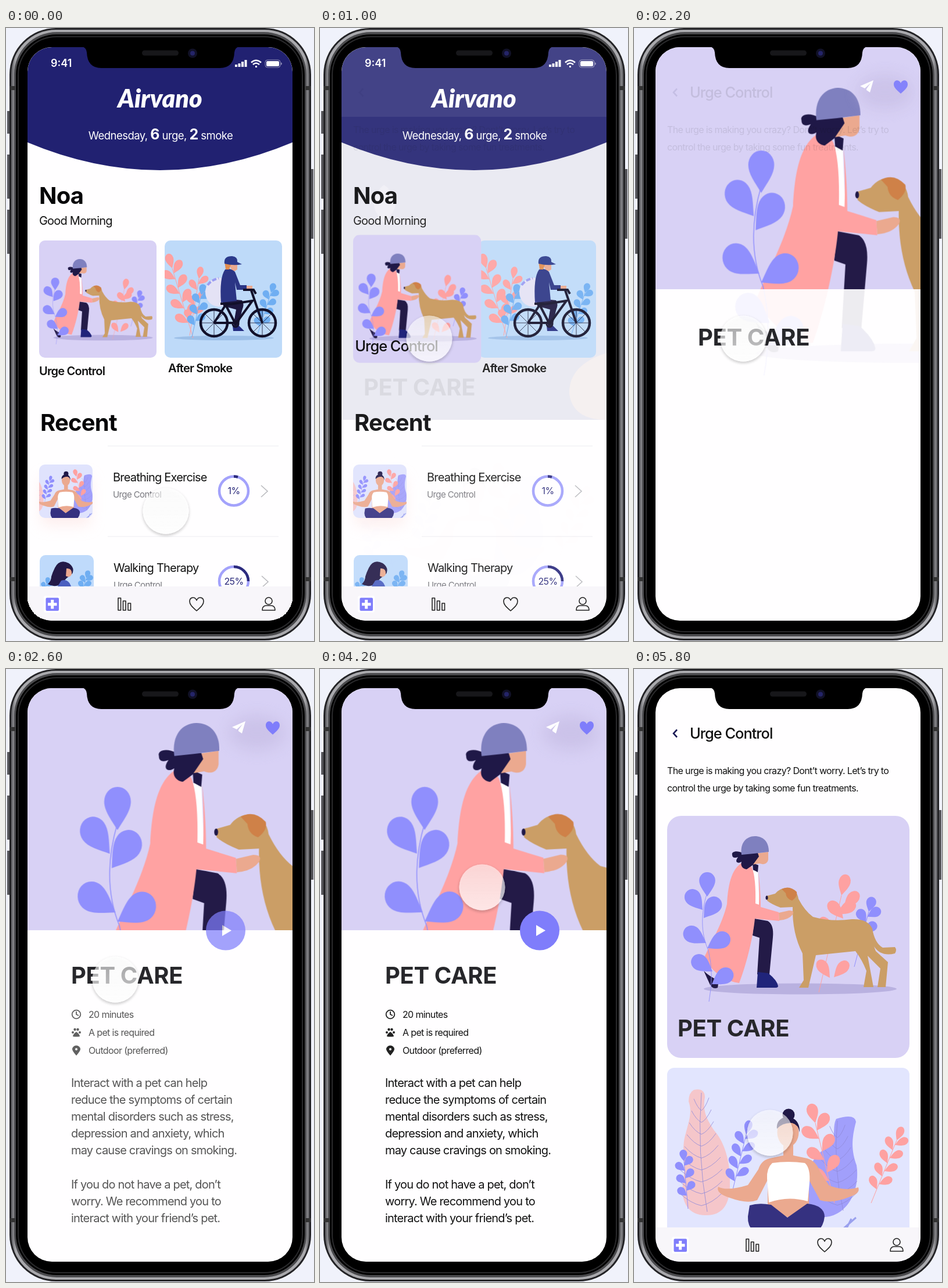
These frames come from a looping animation (530 px wide and 1056 px high, 5.9 s). An HTML page:

```html
<!DOCTYPE html>
<html lang="en">
<head>
<meta charset="utf-8">
<title>Urge control app</title>
<style>
html, body { margin: 0; width: 100%; height: 100%; overflow: hidden; background: #f0f2fb; }
svg { display: block; width: 100vw; height: 100vh; }
text { font-family: Inter, Roboto, sans-serif; letter-spacing: -.04em; fill: #111; white-space: pre; }
.big { font-size: 40px; font-weight: 700; letter-spacing: -.02em; fill: #050507; }
.t20 { font-size: 20px; }
.t16 { font-size: 16px; }
.semi { font-weight: 600; }
.grey { fill: #77777d; font-size: 15px; }
.mid { text-anchor: middle; }
.line { fill: none; stroke: #222; stroke-width: 1.6; stroke-linejoin: round; stroke-linecap: round; }
.anim { animation: 5.9s ease-in-out infinite; }

.home { animation-name: home; }
@keyframes home { 0%, 16.1% { opacity: 1 } 20.34%, 100% { opacity: 0 } }
.veil { animation-name: veil; }
@keyframes veil { 0%, 16.1% { opacity: 0 } 16.6% { opacity: 1 } 20.34%, 100% { opacity: 0 } }
.urge { animation-name: urge; }
@keyframes urge {
  0%, 16.1% { opacity: 0 } 20.34%, 33.05% { opacity: 1 }
  38.5%, 71.53% { opacity: 0 } 75.93%, 100% { opacity: 1 }
}
.next { animation-name: next; }
@keyframes next {
  0%, 16.7% { opacity: 0 } 20.34%, 33.05% { opacity: 1 }
  37%, 71.53% { opacity: 0 } 75.93%, 100% { opacity: 1 }
}
.label { animation-name: label; animation-timing-function: step-end; }
@keyframes label { 0% { opacity: 1 } 16.1%, 100% { opacity: 0 } }
.heading { animation-name: heading; }
@keyframes heading {
  0%, 16.09% { opacity: 0; transform: translate(57px, 598px) }
  16.1% { opacity: 1; transform: translate(57px, 598px) }
  20.34%, 33.05% { opacity: 1; transform: translate(96px, 120px) }
  38.5%, 71.53% { opacity: 0; transform: translate(96px, 120px) }
  75.93%, 100% { opacity: 1; transform: translate(96px, 120px) }
}
.frame { animation-name: frame; }
@keyframes frame {
  0%, 16.1% { x: 57px; y: 366px; width: 202px; height: 202px; rx: 10px }
  20.34%, 33.05% { x: 57px; y: 253px; width: 417px; height: 417px; rx: 24px }
  37.1%, 71.53% { x: 37px; y: 33px; width: 456px; height: 417px; rx: 0px }
  75.93%, 100% { x: 57px; y: 253px; width: 417px; height: 417px; rx: 24px }
}
.pet { animation-name: pet; }
@keyframes pet {
  0%, 16.1% { transform: matrix(.515, 0, 0, .515, 19.7, 249.7) }
  20.34%, 33.05% { transform: matrix(1, 0, 0, 1, 0, 0) }
  38.14% { transform: matrix(1.645, 0, 0, 1.78, 17, -420); animation-timing-function: ease-out }
  49%, 71.53% { transform: matrix(1.66, 0, 0, 1.77, -29, -416.5) }
  75.93%, 100% { transform: matrix(1, 0, 0, 1, 0, 0) }
}
.ghost { animation-name: ghost; }
@keyframes ghost { 0%, 33.05% { opacity: 0 } 35%, 37.3% { opacity: .08 } 39%, 100% { opacity: 0 } }
.petTitle { animation-name: petTitle; }
@keyframes petTitle {
  0%, 16.1% { opacity: 0; transform: translate(75px, 633px) }
  20.34%, 33.05% { opacity: 1; transform: translate(75px, 633px) }
  38.14%, 71.53% { opacity: 1; transform: translate(112px, 542px) }
  75.93%, 100% { opacity: 1; transform: translate(75px, 633px) }
}
.tools { animation-name: tools; }
@keyframes tools { 0%, 33.05% { opacity: 0 } 38.14%, 71.53% { opacity: 1 } 75.93%, 100% { opacity: 0 } }
.detail { animation-name: detail; }
@keyframes detail { 0%, 39.8% { opacity: 0 } 46.6%, 71.53% { opacity: 1 } 75.93%, 100% { opacity: 0 } }
.nav { animation-name: nav; }
@keyframes nav { 0%, 33.05% { opacity: 1 } 37%, 71.53% { opacity: 0 } 75.93%, 100% { opacity: 1 } }
.cursor { animation-name: cursor; }
@keyframes cursor {
  0% { transform: translate(275px, 832px) }
  11.86%, 60.2% { transform: translate(188px, 535px) }
  70.3%, 78% { transform: translate(279px, 376px) }
  95%, 100% { transform: translate(234px, 799px) }
}
</style>
</head>
<body>
<svg viewBox="0 0 530 1056" preserveAspectRatio="none">
<defs>
  <clipPath id="screen"><rect x="37" y="33" width="456" height="988" rx="42"/></clipPath>
  <clipPath id="card"><rect class="anim frame"/></clipPath>
  <clipPath id="yogaCard"><rect x="57" y="687" width="417" height="417" rx="12"/></clipPath>
  <clipPath id="bikeCard"><rect x="273" y="366" width="202" height="202" rx="10"/></clipPath>
  <clipPath id="thumbA"><rect x="57" y="752" width="92" height="92" rx="10"/></clipPath>
  <clipPath id="thumbB"><rect x="58" y="908" width="93" height="92" rx="10"/></clipPath>
  <linearGradient id="glass" x2="0" y2="1">
    <stop stop-color="#fff" stop-opacity=".4"/><stop offset="1" stop-color="#fff" stop-opacity=".66"/>
  </linearGradient>
  <linearGradient id="metal">
    <stop stop-color="#5c5c60"/><stop offset=".015" stop-color="#a9a9ad"/>
    <stop offset=".985" stop-color="#a9a9ad"/><stop offset="1" stop-color="#5c5c60"/>
  </linearGradient>
  <filter id="shadow" x="-30%" y="-30%" width="160%" height="160%">
    <feDropShadow dx="0" dy="2" stdDeviation="2.5" flood-color="#222" flood-opacity=".45"/>
    <feComposite in2="SourceAlpha" operator="out" result="rim"/>
    <feMerge><feMergeNode in="rim"/><feMergeNode in="SourceGraphic"/></feMerge>
  </filter>
  <filter id="blur" x="-60%" y="-60%" width="220%" height="220%"><feGaussianBlur stdDeviation="13"/></filter>
  <path id="heart" d="M0 11C-8 4-12 0-12-5C-12-13-3-14 0-7C3-14 12-13 12-5C12 0 8 4 0 11Z"/>

  <g id="petArt">
    <ellipse cx="286" cy="551" rx="166" ry="9.5" fill="#b9b1e0"/>
    <g id="petBack"></g>
    <path fill="#231a47" d="M120 520Q130 530 146 537L144 549Q135 553 130 542Z"/>
    <path fill="#231a47" d="M207 430L230 434Q241 440 239 462L233 526H212L216 463L204 459Z"/>
    <path fill="#20247a" d="M213 522L231 524Q246 536 248 546Q248 549 244 549H211Z"/>
    <path fill="#fff" d="M203 347L213 344L216 410L208 405Z"/>
    <path fill="#ffa2a2" d="M194 330C168 338 162 370 160 405C152 440 130 475 121 497C135 525 160 538 181 541C195 505 205 460 208 430L250 434L249 419L218 410C218 385 216 365 214 348Q216 380 215 406L209 404Q210 360 203 342Z"/>
    <path fill="#1f1847" d="M204 334L214 338L213 350L205 346Z"/>
    <path fill="#eba98f" d="M210 318L231 315V328C230 335 224 338 216 335L203 337Z"/>
    <path fill="#1f1847" d="M187 317C178 312 167 314 169 320C169 327 176 325 179 324C172 333 179 336 185 332C182 341 190 345 194 345L204 338L215 323L213 317Z"/>
    <path fill="#7f80bf" d="M185 320C182 300 193 288 208 288C222 288 232 297 232 315Q208 318 185 320Z"/>
    <path fill="#cb9e66" d="M228 391L243 387Q252 376 266 377Q281 381 283 396Q294 417 308 427Q340 436 375 431Q402 430 410 447Q414 472 428 480L449 479Q453 484 449 490Q425 496 413 478L416 486L437 505L433 548H419L424 516L402 494L412 548H395L400 520Q392 500 381 486L313 493L300 549H284L292 536L290 490Q272 455 273 410L252 411Q236 405 229 399Z"/>
    <path fill="#cf8148" d="M254 379Q268 372 280 384Q282 392 272 399Q262 396 261 386Z"/>
    <ellipse cx="228.5" cy="394" rx="2" ry="3.5" fill="#1f1847"/>
    <path fill="#eba98f" d="M249 420L267 416Q277 416 273 423Q266 432 250 433Z"/>
    <g id="petFront"></g>
  </g>

  <g id="yogaArt">
    <path fill="#f5c6ca" d="M103 725Q122 721 122 738C118 760 124 774 138 795C156 815 166 850 165 885C166 925 150 941 125 941C95 942 78 920 85 880C90 850 80 830 89 800C96 775 100 762 94 745Q94 730 103 725Z"/>
    <path fill="#a19ffb" d="M348 775Q380 765 382 780C374 810 374 830 383 855C390 900 365 945 325 944C300 942 288 915 292 890C294 860 318 830 335 822C350 810 340 790 348 775Z"/>
    <g id="yogaPlants"></g>
    <circle cx="266" cy="768" r="10.5" fill="#1f1847"/>
    <path fill="#eba98f" d="M257 812H274V838L298 843Q314 848 320 866L336 890Q365 900 386 893Q390 903 372 909Q340 922 320 915L301 880V924L265 945L230 924V880L212 915Q195 922 165 911Q140 903 145 892Q160 900 196 889L214 862Q219 846 234 843L257 838Z"/>
    <ellipse cx="265" cy="798" rx="18.5" ry="25" fill="#eba98f"/>
    <path fill="#1f1847" d="M246 792C243 765 287 763 285 798Q283 785 272 782Q256 781 246 792Z"/>
    <path fill="#fff" d="M238 851Q265 847 294 851Q304 860 302 885L299 917Q265 907 232 919L229 878Q228 860 238 851Z"/>
    <path fill="#353180" d="M199 924Q215 919 236 923L264 945L298 921Q327 924 328 943Q325 975 285 984H240Q194 975 196 943Z"/>
    <path fill="none" stroke="#9aa0ee" stroke-width="3" d="M358 966L382 945M364 967L374 947"/>
  </g>

  <g id="bikeArt">
    <rect x="273" y="366" width="202" height="202" fill="#bedaf9"/>
    <ellipse cx="375" cy="534" rx="86" ry="4" fill="#9cbfe8"/>
    <g id="bikePlants"></g>
    <ellipse cx="366" cy="455" rx="23" ry="25" fill="#e4e2f5"/>
    <path fill="none" stroke="#9a9cf2" stroke-width="4" d="M347 443Q353 434 366 431" stroke-dasharray="8 3"/>
    <path fill="#1d1840" d="M372 466L406 469Q411 475 406 487L400 514H391L396 485L374 479Z"/>
    <path fill="#232b80" d="M390 513H401L410 522H391Z"/>
    <path fill="#eba98f" d="M404 444L424 444V450H404ZM381 401H398V416L390 421Z"/>
    <path fill="#2b3585" d="M377 416Q386 413 394 420L403 443H414V451H397L394 438L397 470L370 473Q367 430 377 416Z"/>
    <path fill="#e28d4e" d="M376 402H389L384 416H378Z"/>
    <path fill="#2b3a8c" d="M376 406Q374 393 389 393Q399 394 398 403L406 407Q392 410 376 406Z"/>
    <g fill="none" stroke="#12102a">
      <g stroke-width="4.5"><circle cx="358" cy="508" r="23"/><circle cx="441" cy="508" r="23"/>
      <path stroke-width="4" d="M358 508L378 477L424 470L395 510L378 477M358 508H395M441 508L422 452M408 451H426L430 458M369 475H386"/></g>
      <path stroke-width=".8" d="M358 486V530M336 508H380M342 492L374 524M342 524L374 492M441 486V530M419 508H463M425 492L457 524M425 524L457 492"/>
      <circle cx="395" cy="510" r="5" stroke-width="3"/>
    </g>
  </g>
</defs>

<!-- phone body -->
<path fill="#55555a" d="M2 143h5v39H2zM2 218h5v76H2zM2 313h5v76H2zM524 243h5v120h-5z"/>
<rect x="6" y="0" width="519" height="1055" rx="80" fill="#232326"/>
<rect x="9" y="3" width="513" height="1049" rx="77" fill="url(#metal)"/>
<rect x="14" y="7" width="503" height="1041" rx="73" fill="#4a4a4d"/>
<path fill="#333" d="M6 100h10v7H6zM515 100h10v7h-10zM6 946h10v7H6zM515 946h10v7h-10z"/>
<rect x="17" y="11" width="497" height="1033" rx="70"/>
<rect x="21" y="15" width="489" height="1025" rx="66" fill="none" stroke="#2a2a2c" stroke-width="2"/>

<g clip-path="url(#screen)">
  <rect x="37" y="33" width="456" height="988" fill="#fffeff"/>

  <g class="anim home">
    <rect x="37" y="33" width="456" height="988" fill="#fffeff"/>
    <g class="anim veil">
      <rect x="37" y="33" width="456" height="642" fill="#e9e8f1"/>
      <path fill="#f5efef" d="M493 560Q428 580 429 630Q435 675 493 675Z"/>
      <path fill="#f0eff6" d="M110 335Q75 300 110 270Q150 300 110 335Z"/>
    </g>
    <path fill="#212171" d="M37 33H493V197Q265 293 37 197Z"/>
    <rect class="anim veil" x="37" y="33" width="456" height="120" fill="#fff" fill-opacity=".08"/>
    <text x="77" y="67" class="semi" font-size="18" style="fill:#fff;letter-spacing:0">9:41</text>
    <g fill="#fff">
      <path d="M394 63h4v4h-4zM399.500 61h4v6h-4zM405 58h4v9h-4zM410.500 55h4v12h-4z"/>
      <rect x="448" y="57" width="22" height="9" rx="2"/><path d="M473.500 59v5q2-2.500 0-5z"/>
    </g>
    <g fill="none" stroke="#fff"><rect x="446" y="55" width="26" height="13" rx="4" opacity=".5"/>
      <path stroke-width="2.600" d="M422 59.500Q430 52 439 59.500M425 63Q430 58 436 63"/><path stroke-width="3" d="M429 66.500h3"/></g>
    <text x="265" y="137" class="mid" font-size="43" font-style="italic" font-weight="900" style="font-family:Lato,sans-serif;fill:#fff;letter-spacing:0">Airvano</text>
    <text x="266" y="192" class="mid" font-size="18.500" style="fill:#fff;letter-spacing:-.03em">Wednesday, <tspan font-size="25" font-weight="700">6</tspan> urge, <tspan font-size="25" font-weight="700">2</tspan> smoke</text>
    <text x="57" y="303" class="big">Noa</text>
    <text x="57" y="339" class="t20">Good Morning</text>
    <g clip-path="url(#bikeCard)"><use href="#bikeArt"/></g>
    <text x="279" y="593" class="t20 semi">After Smoke</text>
    <text x="59" y="694" class="big">Recent</text>
    <path stroke="#ececf0" d="M175 720H469M175 876H469"/>
    <rect x="62" y="775" width="82" height="80" fill="#fbdcd8" opacity=".5" filter="url(#blur)"/>
    <g clip-path="url(#thumbA)"><rect x="57" y="752" width="92" height="92" fill="#e0e3fd"/>
      <use href="#yogaArt" transform="translate(1 472) scale(.385)"/></g>
    <g clip-path="url(#thumbB)">
      <rect x="58" y="908" width="93" height="92" fill="#bfdafb"/>
      <g id="walkPlants"></g>
      <path fill="#231a47" d="M84 930Q92 914 108 922Q119 930 114 940L104 948L96 957Q84 965 72 958Q78 952 78 945Q80 938 84 930Z"/>
      <path fill="#eba98f" d="M104 931Q114 930 113 941Q110 948 103 944Z"/>
      <path fill="#4a5fc0" d="M95 952Q110 947 114 970H84Z"/>
    </g>
    <text x="184" y="781" class="t20">Breathing Exercise</text><text x="184" y="809" class="grey">Urge Control</text>
    <text x="185" y="937" class="t20">Walking Therapy</text><text x="185" y="965" class="grey">Urge Control</text>
    <g fill="none" stroke="#a3a2fb" stroke-width="4.500">
      <circle cx="392" cy="797.500" r="25"/><circle cx="392" cy="953" r="25"/>
      <path stroke="#2c2b7c" d="M392 772.500q3.500 0 7 1M392 928a25 25 0 0 1 25 25"/>
      <path stroke="#b9b9be" stroke-width="1.600" d="M439 788l11 10l-11 10M440 944l11 10l-11 10"/>
    </g>
    <text x="392" y="803" class="mid t16" style="fill:#2c2b7c">1%</text>
    <text x="392" y="959" class="mid t16" style="fill:#2c2b7c">25%</text>
    <text x="57" y="598" class="t20 semi anim label">Urge Control</text>
  </g>

  <g class="anim next" clip-path="url(#yogaCard)">
    <rect x="57" y="687" width="417" height="417" fill="#e2e5fe"/><use href="#yogaArt"/>
  </g>

  <g class="anim ghost"><use href="#petArt" class="anim pet"/></g>
  <g clip-path="url(#card)">
    <rect x="37" y="33" width="456" height="988" fill="#d8d1f5"/>
    <use href="#petArt" class="anim pet"/>
  </g>

  <g class="anim urge">
    <path fill="none" stroke="#1b1b55" stroke-width="2.600" d="M74 104.500L68 111L74 117.500"/>
    <text class="t16" x="57" y="181">The urge is making you crazy? Dont’t worry. Let’s try to</text>
    <text class="t16" x="57" y="211">control the urge by taking some fun treatments.</text>
  </g>
  <text class="anim heading" font-size="25.400" font-weight="500">Urge Control</text>
  <text class="big anim petTitle" style="fill:#27272b;letter-spacing:-.01em">PET CARE</text>

  <g class="anim tools">
    <ellipse cx="432" cy="110" rx="48" ry="30" fill="#b9aed8" opacity=".4" filter="url(#blur)"/>
    <path fill="#fff" d="M412 90L389 100L397 104L407 95L400 105V107L406 111Z"/>
    <use href="#heart" x="459" y="102" fill="#7f7dfb"/>
  </g>
  <g class="anim detail">
    <circle cx="378" cy="450.500" r="34" fill="#7f7dfb"/><path fill="#fff" d="M372 441V460L388 450.500Z"/>
    <g fill="none" stroke="#222" stroke-width="1.800"><circle cx="121" cy="595" r="7.300"/><path d="M121 590v5l4 2"/></g>
    <g fill="#222"><path d="M121 625Q126 628 127 633Q121 634 115 633Q116 628 121 625Z"/>
      <circle cx="115" cy="626" r="2"/><circle cx="118.500" cy="621" r="2.200"/><circle cx="123.500" cy="621" r="2.200"/><circle cx="127" cy="626" r="2"/>
      <path fill-rule="evenodd" d="M121 666Q114 658 114 655A7 6.500 0 0 1 128 655Q128 658 121 666ZM119 655a2 2 0 0 0 4 0a2 2 0 0 0-4 0Z"/></g>
    <g class="t16"><text x="142" y="601">20 minutes</text><text x="142" y="631.500">A pet is required</text><text x="142" y="663">Outdoor (preferred)</text></g>
    <g id="story" class="t20"></g>
  </g>

  <g class="anim nav">
    <rect x="37" y="962" width="456" height="59" fill="#f8f6fa"/>
    <rect x="65" y="978" width="29" height="29" rx="4" fill="#fff"/>
    <rect x="68.500" y="981.500" width="22.500" height="22.500" rx="2" fill="#7f7dfb"/>
    <path stroke="#fff" stroke-width="5" d="M79.700 985v15.500M72 992.700h15.500"/>
    <g class="line">
      <path d="M193 982h4.500v21h-4.500zM201.500 987h4.500v16h-4.500zM210 991h4.500v12h-4.500z"/>
      <use href="#heart" x="328" y="993"/>
      <circle cx="452" cy="987" r="6"/><path d="M441 1003Q441 995 448 995H456Q463 995 463 1003Z"/>
    </g>
  </g>
  <g class="anim cursor"><circle r="39.500" fill="url(#glass)" filter="url(#shadow)"/></g>
</g>

<!-- notch -->
<path d="M130 32Q138 33 139 42Q140 69 164 69H368Q392 69 393 42Q394 33 402 32Z"/>
<rect x="234" y="38.500" width="63" height="9" rx="4.500" fill="#17171a"/>
<circle cx="321" cy="43.500" r="8" fill="#111127"/><circle cx="321" cy="43.500" r="4" fill="#242468"/>
</svg>
<script>
const PINK = '#fea1a1', PURPLE = '#908ffd', BLUE = '#6faef2';
const add = (id, html) => document.getElementById(id).insertAdjacentHTML('beforeend', html);

// Teardrop leaf whose tip sits at x, y
function leaf(color, x, y, len, angle, ratio = .66) {
  const w = len * ratio / 2, h = -len;
  return `<path fill="${color}" transform="translate(${x} ${y}) rotate(${angle})" d="M0 0C${-w * .5} ${h * .25} ${-w} ${h * .45} ${-w} ${h * .66}A${w} ${len * .34} 0 0 1 ${w} ${h * .66}C${w} ${h * .45} ${w * .5} ${h * .25} 0 0Z"/>`;
}

// Straight stem with pairs of leaves and one on top
function sprig(id, color, x0, y0, x1, y1, pairs, len, ratio) {
  const lean = Math.atan2(x1 - x0, y0 - y1) * 180 / Math.PI;
  let html = `<path stroke="${color}" d="M${x0} ${y0}L${x1} ${y1}"/>` + leaf(color, x1, y1, len, lean, ratio);
  for (let i = 0; i < pairs; i++) {
    for (const side of [-1, 1]) {
      const k = 1 - (i + (side > 0 ? .35 : .75)) / (pairs + .8);
      html += leaf(color, x0 + (x1 - x0) * k, y0 + (y1 - y0) * k, len, lean + side * 45, ratio);
    }
  }
  add(id, html);
}

function veins(id, x, y, height, reach, count) {
  let d = `M${x} ${y}Q${x - 8} ${y + height / 2} ${x + 10} ${y + height}`;
  for (let i = 1; i <= count; i++) {
    const v = y + height * i / (count + 1), r = reach * Math.min(1, .25 + i / count);
    d += `M${x - r} ${v - 10}Q${x - r / 2} ${v + 6} ${x} ${v + 10}Q${x + r / 2} ${v + 6} ${x + r} ${v - 12}`;
  }
  add(id, `<path fill="none" stroke="#9089d8" stroke-width=".8" d="${d}"/>`);
}

sprig('petBack', PURPLE, 379, 513, 404, 418, 3, 26);
sprig('petBack', PINK, 318, 557, 357, 390, 1, 37, .55);
add('petBack', [[361, 412, 37, 42], [360, 430, 38, -40], [344, 531, 36, 42], [337, 532, 36, -33]].map(l => leaf(PINK, ...l, .55)).join(''));
add('petFront', `<path fill="none" stroke="${PURPLE}" stroke-width=".9" d="M126 385C112 430 118 462 128 485Q138 525 129 573"/>` +
  [[126, 392, 42, 0], [118, 415, 42, -38], [120, 429, 43, 37], [124, 472, 44, -58], [126, 481, 44, 60], [135, 521, 42, -55], [134, 543, 42, 57]]
    .map(l => leaf(PURPLE, ...l)).join(''));

veins('yogaPlants', 116, 730, 205, 36, 9);
veins('yogaPlants', 350, 778, 155, 34, 7);
sprig('yogaPlants', PURPLE, 93, 930, 86, 848, 3, 20);
sprig('yogaPlants', PURPLE, 168, 905, 193, 802, 4, 25, .55);
sprig('yogaPlants', PINK, 345, 920, 312, 782, 3, 34, .58);
sprig('yogaPlants', PINK, 408, 920, 452, 812, 4, 25, .55);

sprig('bikePlants', PINK, 322, 534, 286, 414, 4, 26, .55);
sprig('bikePlants', PINK, 316, 530, 332, 432, 3, 21, .55);
sprig('bikePlants', BLUE, 320, 532, 336, 460, 3, 19);
sprig('bikePlants', BLUE, 432, 530, 456, 456, 4, 17);
sprig('walkPlants', BLUE, 130, 975, 138, 948, 2, 14);
sprig('walkPlants', BLUE, 66, 975, 70, 958, 1, 12);

const story = ['Interact with a pet can help', 'reduce the symptoms of certain', 'mental disorders such as stress,',
  'depression and anxiety, which', 'may cause cravings on smoking.', '', 'If you do not have a pet, don’t',
  'worry. We recommend you to', 'interact with your friend’s pet.'];
add('story', story.map((line, i) => `<text x="112" y="${719.500 + 29.200 * i}">${line}</text>`).join(''));
</script>
</body>
</html>
```
